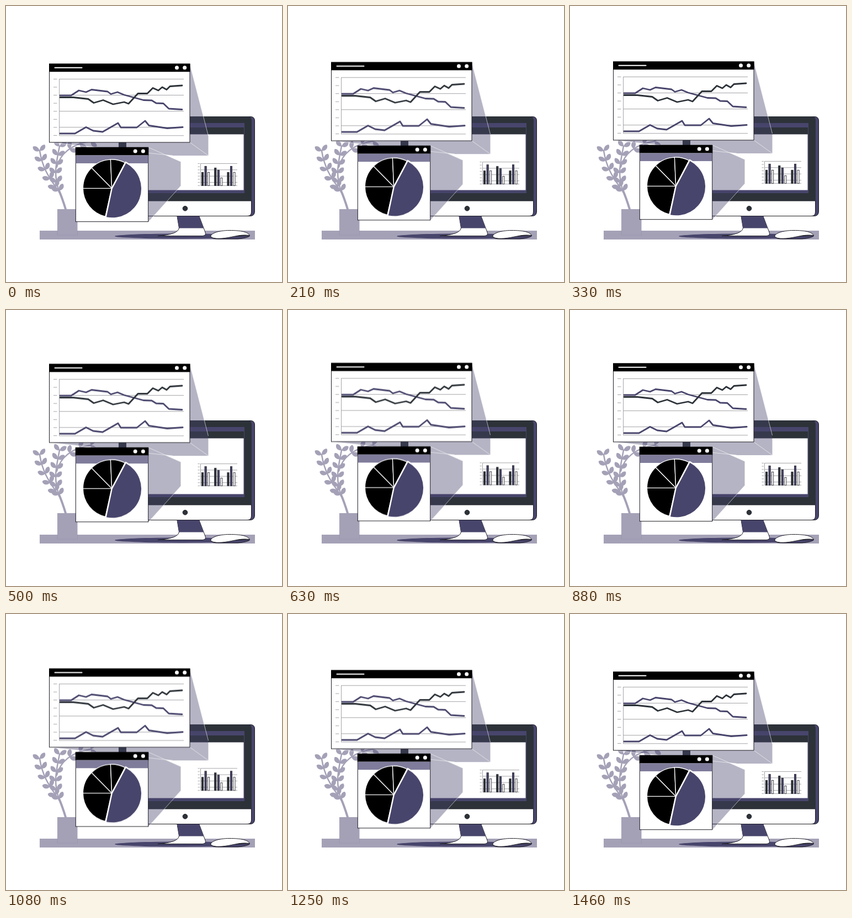
Animation of 500 by 500 pixels, one loop 1500 ms. Source, as an HTML page:

```html
<!DOCTYPE html>
<html lang="en">
<head>
<meta charset="utf-8">
<title>Dashboard</title>
<style>
html, body { margin: 0; width: 100%; height: 100%; overflow: hidden; background: #fff; }
svg { display: block; width: 100%; height: 100%; }
.navy { fill: #48456c; }
.dark { fill: #2c3238; }
.pale { fill: #a4a1b7; }
.white { fill: #fff; }
.edge { stroke: #1c1c24; stroke-width: 1; }
.seam { fill: none; stroke: #fff; stroke-opacity: .6; }
.grid { fill: none; stroke: #9a9aa0; stroke-width: .9; }
.stem { fill: none; stroke: #a4a1b7; stroke-width: 2.5; stroke-linecap: round; }
.series { fill: none; stroke-width: 2.8; stroke-linecap: round; stroke-linejoin: round; }
</style>
</head>
<body>
<svg viewBox="0 0 500 500">
  <defs>
    <path id="pair" d="M0 0C-1-6-6-11-11-9C-13-3-7 3 0 0C1-6 6-11 11-9C13-3 7 3 0 0Z"/>
  </defs>

  <g id="plant" class="pale">
    <path class="stem" style="stroke-width:4" d="M108 368Q102 348 95 332"/>
    <path class="stem" d="M97 338C84 318 67 300 61 262"/>
    <path class="stem" d="M97 338C85 305 91 285 97 254"/>
    <path class="stem" d="M92 292C98 268 118 250 154 245"/>
  </g>

  <rect class="pale" x="61" y="407" width="390" height="16"/>
  <rect class="pale" x="93" y="368" width="36.500" height="47"/>
  <path fill="none" stroke="#9794ad" stroke-width=".7" d="M93 407V415H129.500V407"/>

  <g id="computer">
    <ellipse class="navy" cx="319.500" cy="417" rx="122.500" ry="4.700"/>
    <path class="white edge" d="M310 381H350L361 410Q363 416 356 416.500H275Q312 414 313.500 402Z"/>
    <path class="navy" d="M310 381H350L358 402.500H313.500Z"/>
    <path class="navy edge" d="M212 200.500H443Q450.500 200.500 450.500 208V372Q450.500 380.500 442 380.500H212Z"/>
    <path class="dark" d="M204 208Q204 200 212 200H438Q445 200 445 208V353H204Z"/>
    <path class="white edge" d="M204.500 353H444.500V373Q444.500 380.500 437 380.500H212Q204.500 380.500 204.500 373Z"/>
    <rect class="navy" x="218" y="212" width="214" height="127"/>
    <rect class="dark" x="218" y="220" width="213" height="12.500"/>
    <rect class="white" x="218" y="232.500" width="212.500" height="101"/>
    <circle class="dark edge" cx="324.500" cy="366.800" r="4.300"/>
    <path class="navy edge" d="M371 418Q373 422 385 422H420Q440 420 441.500 416Z"/>
    <path class="white edge" d="M371 418C370 412 385 406.500 405 406.500C425 406.500 438 409 441.500 415.500C428 414 420 416 408 418.500C394 421.500 376 423 371 418Z"/>
  </g>

  <g id="float">
    <g id="bars"></g>
    <g class="navy" opacity=".4">
      <path d="M79 247L333 105L366.500 235V271H302Z"/>
      <path d="M258 256L316.500 282V326L258 391Z"/>
    </g>
    <path class="seam" d="M333 105L366.500 235M366.500 271L333 247M79 247L302 271M258 256L316.500 282M316.500 326L258 391"/>
    <g id="lines"></g>
    <g id="pie"></g>
  </g>
</svg>
<script>
const NS = "http://www.w3.org/2000/svg";
const byId = id => document.getElementById(id);
const range = n => Array.from({ length: n }, (_, i) => i);

function add(parent, tag, attrs) {
  const el = document.createElementNS(NS, tag);
  for (const key in attrs) el.setAttribute(key, attrs[key]);
  return parent.appendChild(el);
}

// Leaf pairs at even steps along a stem, turned to its direction
function addLeaves(stem, from, count) {
  const length = stem.getTotalLength();
  range(count).forEach(i => {
    const at = length * (from + (1 - from) * i / (count - 1));
    const a = stem.getPointAtLength(at - 1), b = stem.getPointAtLength(at);
    const turn = Math.atan2(b.y - a.y, b.x - a.x) * 180 / Math.PI + 90;
    add(byId("plant"), "use", { href: "#pair", transform: `translate(${b.x} ${b.y}) rotate(${turn})` });
  });
}
const [, left, right, branch] = document.querySelectorAll(".stem");
addLeaves(left, .15, 5);
addLeaves(right, .05, 6);
addLeaves(branch, .5, 3);

// A window with a title bar and two buttons
function addWindow(parent, x, y, w, h) {
  add(parent, "rect", { class: "white edge", x, y, width: w, height: h });
  add(parent, "rect", { x: x - .5, y: y - .5, width: w + 1, height: 14.7 });
  for (const gap of [9.3, 23.5])
    add(parent, "circle", { class: "white", cx: x + w - gap, cy: y + 6.7, r: 3.5 });
}

// Line chart
const lines = byId("lines");
addWindow(lines, 78.5, 105, 254.5, 142);
add(lines, "path", { d: "M88.5 111.7H137.5", stroke: "#fff", "stroke-width": 2, "stroke-linecap": "round" });
const rules = range(4).map(i => `M96.5 ${132.4 + i * 29.1}H322`).join("");
const ticks = range(8).map(i => `M86 ${132.4 + i * 14.58}H92.5`).join("");
add(lines, "path", { class: "grid", d: "M322 234.8H96.5V132" + rules + ticks });

function addSeries(stroke, points) {
  add(lines, "polyline", { class: "series", stroke, points });
}
addSeries("#48456c", "98,162 118,162 132,153 145,156 155,151.5 184,155 190,159.5 202,156 214,161 249,170.5 264,171 272,176 285,176.5 295,186 319,187.5");
addSeries("#2c3238", "98,165.5 122,165.5 149,168.5 159,175.5 176,170.5 194,178 214,174 222,177 239,158.5 256,158.5 266,148.5 276,153 283,147 291,151.5 297,145.5 319,144");
addSeries("#48456c", "98,231 125,231 145,219.5 158,226 175,228 203,212 208,220 237,220 252,208 259,216.5 292,221.5 320,219.5");

// Pie chart
const pie = byId("pie");
addWindow(pie, 126.3, 256.3, 131.4, 134.4);
add(pie, "rect", { x: 126.8, y: 270.5, width: 130.4, height: 14.5, fill: "#7f7c9b" });

function addSlice(cx, cy, from, to, attrs) {
  const r = 52.3;
  const rim = deg => {
    const a = deg * Math.PI / 180;
    return `${cx + r * Math.cos(a)} ${cy + r * Math.sin(a)}`;
  };
  const large = to - from > 180 ? 1 : 0;
  add(pie, "path", { d: `M${cx} ${cy}L${rim(from)}A${r} ${r} 0 ${large} 1 ${rim(to)}Z`, ...attrs });
}
const cuts = [103, 180, 225.5, 267.5, 297];
cuts.slice(1).forEach((to, i) =>
  addSlice(191.7, 330.3, cuts[i], to, { stroke: "#fff", "stroke-width": 1.3 }));
addSlice(192.8, 331, -62, 102, { class: "navy", stroke: "#fff", "stroke-width": 5, "paint-order": "stroke" });

// Bar chart
const bars = byId("bars");
const marks = range(8).map(i => `M347.5 ${285.4 + i * 5.7}H351`).join("");
const levels = range(4).map(i => `M352.5 ${285.4 + i * 11.4}H419`).join("");
add(bars, "path", { class: "grid", d: "M352.5 285V325.3H419" + marks + levels });
[[24, 35, 24], [32, 28, 14], [24, 35, 24]].forEach((group, g) =>
  group.forEach((height, i) => add(bars, "rect", {
    class: ["dark", "navy", "white"][i] + " edge",
    x: 354.5 + g * 23.2 + i * 5.5, y: 325.3 - height, width: 3.2, height, style: "stroke-width:.8"
  })));

// 24 drawings a second; the rise and fall span the first and last of them
const FRAMES = 36;
byId("float").animate([
  { transform: "translateY(0px)" },
  { transform: "translateY(-10px)", offset: (FRAMES - 1) / 2 / FRAMES },
  { transform: "translateY(0px)", offset: (FRAMES - 1) / FRAMES },
  { transform: "translateY(0px)" }
], { duration: 1500, iterations: Infinity, easing: `steps(${FRAMES}, end)` });
</script>
</body>
</html>
```
